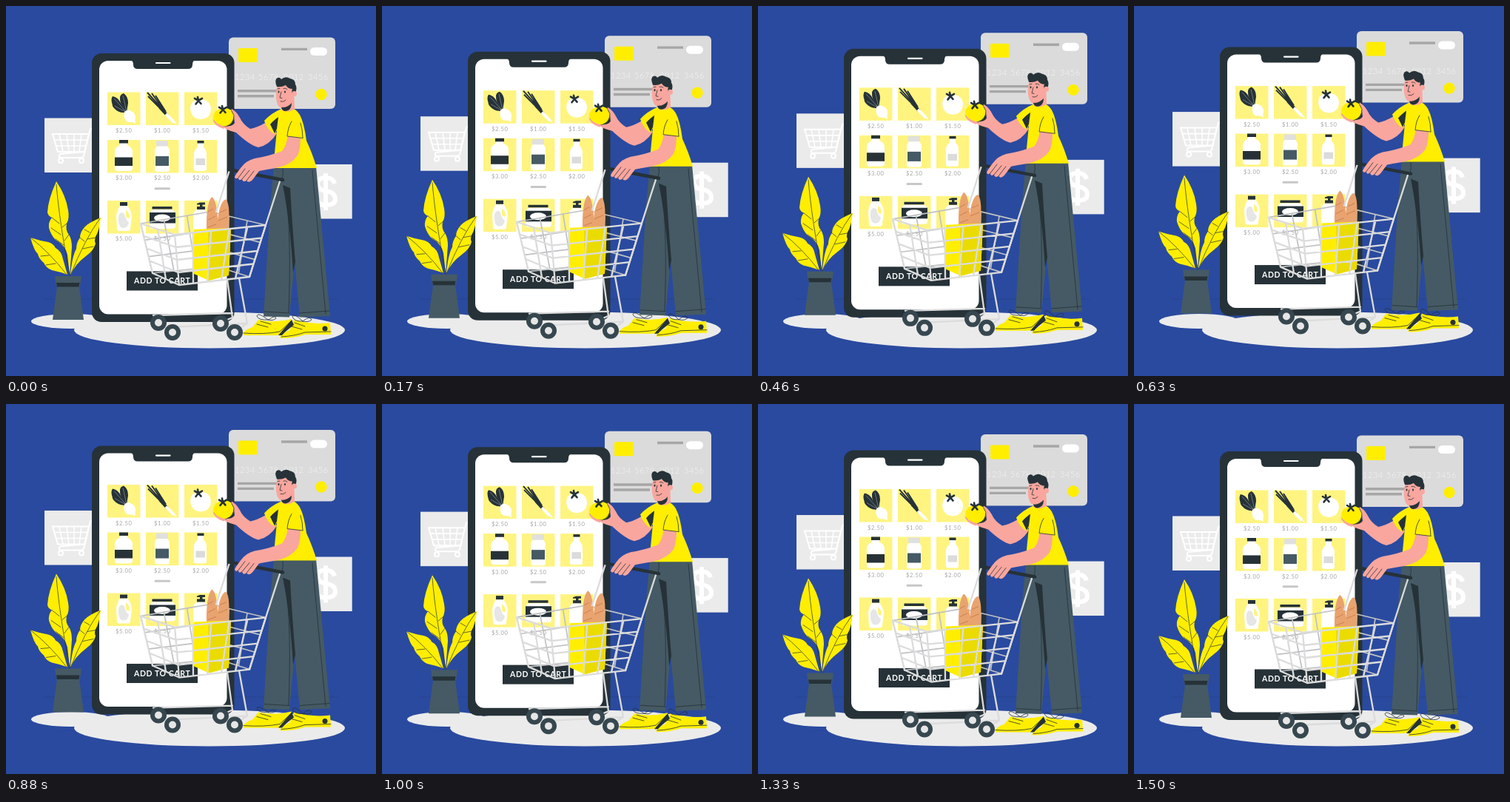
These frames come from a looping animation (500 by 500 pixels, 1.54 s). An HTML page:

```html
<!DOCTYPE html>
<html lang="en">
<head>
<meta charset="utf-8">
<title>Grocery shopping</title>
<style>
html, body { margin: 0; height: 100%; overflow: hidden; background: #2a4a9f; }
svg { display: block; width: 100vw; height: 100vh; }
text { font-family: Lato, sans-serif; }
.ink { fill: #263238; }
.slate { fill: #455a64; }
.sun { fill: #ffee00; }
.pale { fill: #fff480; }
.skin { fill: #f9a69e; }
.white { fill: #fff; }
.soft { fill: #ebebeb; }
.line { fill: none; stroke: #263238; stroke-width: .8; stroke-linecap: round; stroke-linejoin: round; }
.wire { fill: none; stroke: #dcdcdc; stroke-width: 2.3; stroke-linecap: round; stroke-linejoin: round; }
.far { stroke: #bfc1c3; stroke-width: 1.7; }
.price { font-size: 7.6px; letter-spacing: .6px; fill: #a6a6a6; text-anchor: middle; }
</style>
</head>
<body>
<svg viewBox="0 0 500 500">
<defs>
  <path id="calyx" d="M0 0L-5 -3M0 0L-1 -5M0 0L5 -3M0 0L3.500 4M0 0L-3.500 4.500" stroke="#263238" stroke-width="2.6" stroke-linecap="round"/>
</defs>
<path d="M50 396H448" stroke="#263f88" stroke-width=".8"/>
<g fill="#ebebeb">
  <ellipse cx="88" cy="426" rx="54" ry="10"/>
  <ellipse cx="275" cy="438" rx="183" ry="24.5"/>
</g>

<g id="scene">
  <g id="card">
    <rect x="301" y="42.5" width="144" height="96.5" rx="6" fill="#dbdbdb"/>
    <rect class="sun" x="314" y="57" width="26" height="19" rx="1.5"/>
    <path d="M372 58.4H407M313 114.8H373M313 121.8H362" stroke="#a6a6a6" stroke-width="3.4"/>
    <rect class="white" x="411" y="56" width="23" height="11" rx="5.5"/>
    <g font-size="11" font-weight="300" letter-spacing=".5" fill="#f5f5f5">
      <text x="309" y="100">1234</text><text x="341" y="100">5678</text>
      <text x="375" y="100">9012</text><text x="408" y="100">3456</text>
    </g>
    <circle class="sun" cx="426" cy="119.5" r="7.7"/>
  </g>

  <g id="badges">
    <rect class="soft" x="52" y="151.5" width="74" height="73.5"/>
    <g fill="none" stroke="#fff" stroke-width="2">
      <path d="M120 166H114L105 203Q104 205 101 205H74Q70 204 73 200L106 197M63 173H112L106 197H70Z"/>
      <path d="M65 181H110M68 189H108M72 173L77 197M82 173L85 197M92 173V197M102 173L99 197" stroke-width="1.6"/>
      <circle cx="74" cy="209" r="3"/><circle cx="102" cy="209" r="3"/>
    </g>
    <rect class="soft" x="394" y="214" width="73.7" height="73.5"/>
    <path d="M444 240Q442 232 432 232Q421 232 421 240Q421 248 432 250Q445 252 445 261Q445 269 432 269Q421 269 419 260M432 226V276" fill="none" stroke="#fff" stroke-width="6"/>
  </g>

  <g id="phone">
    <rect class="ink" x="116" y="64" width="192.5" height="363" rx="13"/>
    <rect class="white" x="126" y="74" width="172.5" height="342.5" rx="12"/>
    <path class="ink" d="M168 73H256Q252 74 252 79Q252 85 246 85H178Q172 85 172 79Q172 74 168 73Z"/>
    <path d="M203 77H221.500" stroke="#fff" stroke-width="2.2" stroke-linecap="round"/>
    <g id="tiles"></g>
    <path d="M202 246.700H220.500" stroke="#c7c7c7" stroke-width="3" stroke-linecap="round"/>

    <g class="ink">
      <path d="M162 144Q150 143 144 134Q141 126 144 122Q151 123 155 131Z"/>
      <path d="M163 144Q153 133 154 123Q155 119 159 118Q165 122 165 131Z"/>
      <path d="M161 144Q152 145 146 138Q143 135 144 132Q152 131 157 137Z"/>
    </g>
    <path d="M146 125L162 143M158 121L163 143M147 135L161 143" fill="none" stroke="#8a969c" stroke-width=".7"/>
    <path class="white" d="M160 143Q165 139 169 142Q175 144 175 151Q174 157 175 159Q170 156 165 157Q158 154 160 143Z"/>
    <path d="M192 122L214 144M191 117L212 140M197 118L214 142M202 121L216 143" stroke="#263238" stroke-width="1.9"/>
    <path d="M208 137L218 148" stroke="#263238" stroke-width="4"/>
    <path d="M216 146L227 157" stroke="#fff" stroke-width="4"/><path d="M225 155L230 159" stroke="#fff" stroke-width="1.600"/>
    <path class="white" d="M249 138Q250 128 258 127Q275 124 277 138Q277 152 263 153Q250 152 249 138Z"/>
    <use href="#calyx" x="260" y="128"/>

    <path class="white" d="M154 185H164V188Q171 191 171 197V219Q171 223 167 223H151Q147 223 147 219V197Q147 191 154 188Z"/>
    <path class="ink" d="M153 181H165V185.500H153ZM147 204.500H171V216H147Z"/>
    <path class="white" d="M204 189H218L221 194V221Q221 224 218 224H204Q201 224 201 221V194Z"/>
    <rect x="203" y="182" width="16" height="7.500" rx="1" fill="#e0e0e0"/>
    <path class="slate" d="M202 203H220V216H202Z"/>
    <path class="white" d="M259 185H267V191Q271 195 271 200V220Q271 223 268 223H257Q254 223 254 220V200Q254 195 259 191Z"/>
    <path class="ink" d="M258.500 182H267.500V185.500H258.500Z"/><path d="M256.500 206H269V215H256.500Z" fill="#dbdbdb"/>

    <path class="white" d="M154 270H164Q169 276 170 284L168 301Q168 304 165 304H153Q150 304 150 301L149 284Q150 276 154 270Z"/>
    <path d="M152 284Q155 276 160 281Q162 290 166 292Q165 300 158 300Q151 299 152 284Z" fill="#e6e6e6"/>
    <path class="pale" d="M162 276Q167 279 167 286Q164 289 162 284Z"/>
    <path class="ink" d="M154 265H164V270H154Z"/>
    <path class="white" d="M198 275H225Q229 278 229 282V297Q229 301 225 301H198Q194 301 194 297V282Q194 278 198 275Z"/>
    <path class="ink" d="M197.500 271H224.500V274.500H197.500ZM194 279H229V293.500H194Z"/>
    <ellipse class="white" cx="211" cy="286.500" rx="11" ry="5"/>
    <path class="white" d="M258 275H268Q273 278 273 283V304H253V283Q253 278 258 275Z"/>
    <path class="ink" d="M258 267L262 265.500H269V268.500H265.500V271H269V275H258V271H262V268.500H258Z"/>

    <rect class="ink" x="163" y="358.500" width="96" height="26"/>
    <text x="211.200" y="375.300" font-size="10.500" font-weight="700" letter-spacing=".6" fill="#fff" text-anchor="middle">ADD TO CART</text>
  </g>

  <g id="plant">
    <path class="sun" d="M68 237Q57 261 56 279Q57 284 62 286Q57 292 58 300Q61 310 67 316Q80 323 83 336L86 364L89 326Q89 315 85 309Q80 303 82 294Q86 287 84 276Q81 256 68 237Z"/>
    <path class="sun" d="M33 313Q45 317 57 319Q64 321 67 327Q75 331 77 342L83 363Q72 359 62 357Q54 354 51 347Q44 341 43 335Q38 331 33 313Z"/>
    <path class="sun" d="M128 286Q111 293 106 299Q100 306 100 313Q95 320 95 328Q89 339 87 364Q93 349 108 338Q119 330 121 321Q119 317 121 312Q126 304 128 286Z"/>
    <path class="line" style="stroke-width:.7" d="M68 241Q72 290 86 364M33 313Q59 333 82 363M127 287Q106 316 87 364M62 286L72 294M61 300L74 309M67 315L78 323M82 294L76 299M85 309L79 317M47 338L58 337M54 350L67 348M106 302L113 306M100 313L106 318M121 313L110 315M118 325L104 328"/>
    <path class="slate" d="M66 365H102L100 379H99L105 424H63L69 379H68Z"/>
    <path class="ink" d="M68 374H99.500L98.500 379.500H69Z"/>
  </g>

  <g id="legs">
    <path class="sun" d="M341 424Q362 429 386 423L384 434L370 445H321Q319 439 333 434Z"/>
    <path class="sun" d="M389 424Q414 431 438 428L439 444L404 444Q390 449 371 449Q369 444 383 438Z"/>
    <path class="line" d="M321 442Q350 444 370 440L386 425M372 447Q390 446 404 441L439 440M344 426L358 430M339 430L354 434M390 428L404 433M386 433L400 437M354 424Q340 413 339 419Q341 425 355 424Q364 417 365 422Q361 426 354 424M401 426Q389 414 387 420Q390 427 401 426Q411 418 413 424Q409 428 401 426"/>
    <path class="ink" d="M368 445L386 424L389 431Q377 440 373 445Z"/>
    <circle class="ink" cx="431" cy="436" r="3.500"/>
    <path class="slate" d="M362 217L357 270L348 419.500L383 420.500L390 345L397 420.500L438 419L419 217Z"/>
    <path class="ink" d="M374 242L384 246Q387 300 391 346L388 360Q384 292 374 242Z"/>
    <path class="line" d="M414 222Q422 310 432 416M378 250Q386 310 382 414M349 413L383 415M397 415L437 412M374 220Q376 235 368 240"/>
  </g>

  <g id="cart">
    <path class="wire far" id="farWires"/>
    <g fill="#e9a36f">
      <path d="M271 306Q270 267 278 258Q286 261 287 306Z"/>
      <path d="M285 306Q286 266 297 261Q304 268 300 306Z"/>
    </g>
    <path d="M273 278L280 274M273 289L283 284M289 279L298 275M287 290L299 285M273 299L284 295" stroke="#c98050" stroke-width="1" fill="none"/>
    <path class="sun" d="M254 302L304 300L301 364L274 371L252 361Z"/>
    <path d="M273 306L304 300L301 364L274 371Z" fill="#eadb00"/>
    <path class="wire" id="nearWires"/>
    <path class="wire" d="M302 222L284 278M370 237L351 296L329 366M299 370L306 421M315 368L326 429L222 434M199 418L306 415M199 418L207 427M306 421L290 428M326 429L309 440"/>
    <g id="wheels"></g>
    <path class="line" d="M301 221L374 235" style="stroke-width:4.500"/>
  </g>

  <g id="body">
    <path class="skin" d="M352 157Q338 165 330 166Q320 160 316 151Q311 142 305 139Q303 143 308 149L309 158Q305 164 292 162Q295 167 311 171Q329 188 341 191Q356 188 366 172Z"/>
    <path class="sun" d="M280 150Q281 141 291 138Q305 136 308 148Q308 161 295 163Q281 162 280 150Z"/>
    <use href="#calyx" x="293" y="140"/>
    <path class="line" d="M281 155Q287 164 297 163Q308 159 308 148L305 142"/>
    <path class="skin" d="M279 152Q285 161 297 163L294 166Q281 162 279 152Z"/>

    <path class="sun" d="M372 139Q358 145 349 155Q352 166 362 173L366 168L361 219H420Q414 199 406 182Q403 158 397 147Q392 139 386 138Z"/>
    <path class="ink" d="M368 150Q360 156 357 160L363 172L366 166Z"/>
    <path class="skin" d="M373 108H389L390 139Q381 145 373 141Z"/>
    <path class="skin" d="M367 107Q363 120 366 130Q368 139 377 139Q387 137 388 124L389 108Z"/>
    <path class="ink" d="M372 137Q380 138 386 131Q386 141 378 142Q373 142 372 137Z"/>
    <path class="ink" d="M366 109Q362 99 367 97Q370 96 372 99Q378 94 384 98Q391 99 391 106Q394 110 391 118L388 121Q385 117 387 112Q381 112 378 107Q372 110 366 109Z"/>
    <circle class="skin" cx="389.500" cy="118.500" r="3.500"/>
    <ellipse class="ink" cx="368.500" cy="116" rx="1" ry="1.600"/><ellipse class="ink" cx="377" cy="116" rx="1" ry="1.600"/>
    <path class="line" d="M367 112L370 111.500M375 111.500Q378 110.500 380 112.500M372 116L370 124L373 124.500M371 129Q375 130.500 378 127"/>

    <path class="skin" d="M381 174Q379 189 373 196Q355 203 336 206Q324 209 317 219Q310 228 309 231Q310 235 314 232Q314 237 319 234Q320 239 325 236Q328 240 333 235L342 223Q352 221 365 219Q385 215 394 202Q398 194 398 176Z"/>
    <path class="line" d="M314 232L323 220M319 234L329 222M325 236L335 223"/>
    <path class="sun" d="M384 150Q380 164 380 176L401 178.500Q404 159 396 148Z"/>
    <path class="line" d="M386 156Q381 164 380 176L401 178.500M398 158Q401 168 401 178"/>
  </g>
</g>
</svg>
<script>
const byId = id => document.getElementById(id);

const prices = [
  [116.5, "$2.50", "$1.00", "$1.50"],
  [181, "$3.00", "$2.50", "$2.00"],
  [263, "$5.00", "$4.50", ""]
];
byId("tiles").innerHTML = prices.map(([y, ...labels]) => labels.map((label, i) => {
  const x = 137 + 52 * i;
  return `<rect class="pale" x="${x}" y="${y}" width="44.5" height="44.5"/>
    <text class="price" x="${x + 22.3}" y="${y + 54.5}">${label}</text>`;
}).join("")).join("");

byId("wheels").innerHTML = [[206, 428], [290, 429], [225, 441], [309, 441]].map(([x, y]) =>
  `<circle cx="${x}" cy="${y}" r="8" fill="#e6e6e6" stroke="#37474f" stroke-width="6"/>`).join("");

// Wire mesh between a top edge (a, b) and a bottom edge (c, d).
const mix = (p, q, k) => p.map((v, i) => v + (q[i] - v) * k);
function mesh(a, b, c, d, rows, cols) {
  let path = "";
  for (let i = 0; i <= rows; i++) path += `M${mix(a, c, i / rows)}L${mix(b, d, i / rows)}`;
  for (let i = 0; i <= cols; i++) path += `M${mix(a, b, i / cols)}L${mix(c, d, i / cols)}`;
  return path;
}
const rim = [[182, 294], [228, 309], [351, 296], [276, 278]];
const base = [[198, 361], [234, 377], [329, 366], [285, 352]];
const side = (i, j, rows, cols) => mesh(rim[i], rim[j], base[i], base[j], rows, cols);
byId("farWires").setAttribute("d", side(0, 3, 3, 3) + side(3, 2, 3, 3));
byId("nearWires").setAttribute("d", side(0, 1, 4, 2) + side(1, 2, 4, 5));

const LOOP = 1540, FLOAT = 1500, LEAD = 30, LIFT = 10, REST = 0.4;
function draw() {
  const t = (Math.min(performance.now() % LOOP, FLOAT) + LEAD) % FLOAT;
  const y = REST - LIFT * (1 - Math.abs(1 - 2 * t / FLOAT));
  byId("scene").setAttribute("transform", `translate(0 ${y})`);
  requestAnimationFrame(draw);
}
draw();
</script>
</body>
</html>
```
